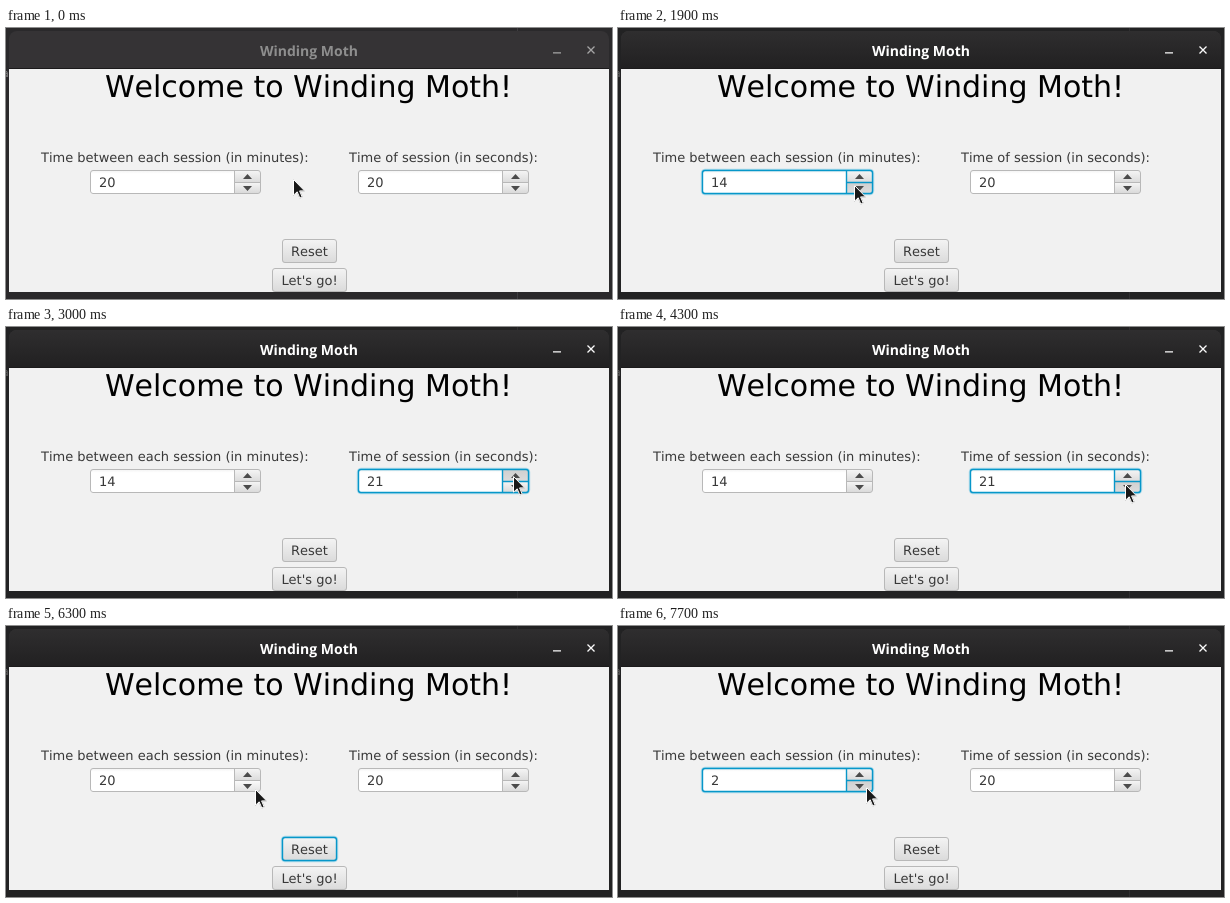
Recreate the animation shown at these times as an HTML page. Size 606 px wide and 271 px high, loop 8 s.

```html
<!DOCTYPE html>
<html lang="en">
<head>
<meta charset="utf-8">
<title>Winding Moth</title>
<style>
html, body { margin: 0; width: 100%; height: 100%; overflow: hidden; background: #2a292b; }
svg { display: block; width: 606px; height: 271px; }
text {
  font: 13px "DejaVu Sans", sans-serif; fill: #383838;
  font-kerning: none; text-rendering: geometricPrecision;
}
.caption { font: bold 14px "Open Sans", "Noto Sans", sans-serif; text-anchor: middle; }
.heading { font-size: 30px; fill: #000; }
.mid { text-anchor: middle; }
.line { fill: none; stroke: #b8b8b8; }
.halo { fill: none; stroke: #039ed3; stroke-width: 1.4; opacity: 0; }
.focus .line { stroke: #0896c8; stroke-width: 1.4; }
.focus .halo { opacity: .3; }
.face { fill: url(#idle); }
.face.hover { fill: url(#hover); }
.face.down { fill: url(#down); }
.arrow { fill: #4b4b4b; }
#cursor { filter: drop-shadow(0 0 .6px #0008); }
</style>
</head>
<body>
<svg viewBox="0 0 606 271">
  <defs>
    <linearGradient id="idle" x2="0" y2="1"><stop stop-color="#f4f4f4"/><stop offset="1" stop-color="#dadada"/></linearGradient>
    <linearGradient id="hover" x2="0" y2="1"><stop stop-color="#fafafa"/><stop offset="1" stop-color="#e3e3e3"/></linearGradient>
    <linearGradient id="down" x2="0" y2="1"><stop stop-color="#d0d0d0"/><stop offset="1" stop-color="#dcdcdc"/></linearGradient>
    <linearGradient id="bar" x2="0" y2="1"><stop stop-color="#2f2e2f"/><stop offset="1" stop-color="#212021"/></linearGradient>
    <linearGradient id="field" x2="0" y2="1"><stop stop-color="#f1f1f1"/><stop offset=".16" stop-color="#fff"/></linearGradient>
  </defs>
  <rect width="606" height="271" fill="#2a292b"/>
  <path d="M511.5 0V271" stroke="#3d3c3f"/>
  <text x="-4" y="49" style="font-size:11px;fill:#8b8b8b">a</text>
  <rect id="shade" width="606" height="271" fill="#151416"/>
  <path d="M3 41V11a8 8 0 0 1 8-8H595a8 8 0 0 1 8 8V41z" fill="#353335"/>
  <path id="active" d="M3 41V11a8 8 0 0 1 8-8H595a8 8 0 0 1 8 8V41z" fill="url(#bar)"/>
  <path d="M3 40.5H603" stroke="#1b1a1b"/>
  <text id="caption" class="caption" x="303" y="28">Winding Moth</text>
  <path id="controls" d="M547 24.8h8M581.5 18.5l7 7m0-7l-7 7" fill="none" stroke-width="1.3"/>
  <rect x="3" y="41" width="600" height="223" fill="#f1f1f1"/>
  <text class="heading" x="98.9" y="69">Welcome to Winding Moth!</text>
  <text x="35" y="134">Time between each session (in minutes):</text>
  <text x="343" y="134">Time of session (in seconds):</text>
  <g id="form"></g>
  <path id="cursor" d="M.5 .5V16.2L4.2 12.8L6.8 19L9.2 18L6.6 11.9H11.6Z" fill="#191919" stroke="#fff" stroke-linejoin="round"/>
</svg>
<script>
const LOOP = 8000, STEP = 100;
const $ = id => document.getElementById(id);

// Pointer moves: start time, end time, x, y
const home = [287, 151];
const moves = [
  [500, 800, 236, 157],
  [2000, 2200, 588, 115],
  [2500, 2800, 507, 149],
  [3600, 4100, 507, 157],
  [4700, 5400, 301, 219],
  [5800, 6400, 248, 161]
];
const clicks = [[1100, "min"], [2900, "sec"], [5500, "reset"], [6400, "min"]];

const clamp = (v, lo, hi) => Math.min(hi, Math.max(lo, v));
const mix = (a, b, p) => a + (b - a) * p;
const grey = (a, b, p) => `rgb(${[0, 0, 0].fill(Math.round(mix(a, b, p)))})`;

// Presses made so far in a run of evenly spaced ones
const presses = (t, start, gap, max) => clamp(Math.floor((t - start) / gap) + 1, 0, max);

// Six clicks down, a reset, then one click that turns into a held button
const minutes = t => t < 5600
  ? 20 - presses(t, 1100, 150, 6)
  : 20 - presses(t, 6400, 300, 1) - presses(t, 6700, 60, 17);
const seconds = t => 20 + presses(t, 2900, 200, 3) - presses(t, 4100, 200, 3);

function tip(t) {
  let [x, y] = home;
  for (const [from, to, toX, toY] of moves) {
    const p = clamp((t - from) / (to - from), 0, 1), e = p * (2 - p);
    x = mix(x, toX, e);
    y = mix(y, toY, e);
  }
  return [Math.round(x), Math.round(y)];
}

const faces = [];
function face(owner, x, y, w, h, r = 0) {
  const id = "face" + faces.length;
  faces.push({ id, owner, x, y, w, h });
  return `<rect id="${id}" class="face" x="${x}" y="${y}" width="${w}" height="${h}" rx="${r}"/>`;
}

function frame(x, y, w, h) {
  return `<rect class="line" x="${x + .5}" y="${y + .5}" width="${w - 1}" height="${h - 1}" rx="2.5"/>
    <rect class="halo" x="${x - .5}" y="${y - .5}" width="${w + 1}" height="${h + 1}" rx="3.5"/>`;
}

function spinner(id, x) {
  const y = 142, split = x + 144.5, mid = x + 157.5;
  return `<g id="${id}">
    <rect x="${x}" y="${y}" width="171" height="24" rx="3" fill="url(#field)"/>
    ${face(id, x + 145, y + 1, 25, 12)}${face(id, x + 145, y + 13, 25, 10)}
    <path class="line" d="M${split} ${y + 1}v22M${split} ${y + 12.5}h26"/>
    ${frame(x, y, 171, 24)}
    <path class="arrow" d="M${mid - 4.5} 151h9l-4.5 -5zM${mid - 4.5} 158h9l-4.5 5z"/>
    <text id="${id}Value" x="${x + 9}" y="159"></text></g>`;
}

function button(id, x, y, w, label) {
  return `<g id="${id}">${face(id, x, y, w, 24, 3)}${frame(x, y, w, 24)}
    <text class="mid" x="${x + w / 2}" y="${y + 17}">${label}</text></g>`;
}

$("form").innerHTML = spinner("min", 84) + spinner("sec", 352) +
  button("reset", 276, 211, 55, "Reset") + button("go", 266, 240, 75, "Let's go!");

function render(t) {
  const [x, y] = tip(t);
  $("cursor").setAttribute("transform", `translate(${x} ${y})`);

  // The window lights up on the first click
  const on = clamp((t - 1000) / 300, 0, 1);
  $("active").setAttribute("opacity", on);
  $("shade").setAttribute("opacity", on * .35);
  $("caption").style.fill = grey(142, 255, on);
  $("controls").style.stroke = grey(165, 250, on);

  $("minValue").textContent = minutes(t);
  $("secValue").textContent = seconds(t);

  const last = clicks.filter(([time]) => time <= t).pop();
  const owner = last ? last[1] : "";
  for (const id of ["min", "sec", "reset", "go"])
    $(id).classList.toggle("focus", id === owner);
  for (const f of faces) {
    const over = x >= f.x && x < f.x + f.w && y >= f.y && y < f.y + f.h;
    const list = $(f.id).classList;
    list.toggle("hover", over);
    list.toggle("down", over && f.owner === owner && owner !== "reset");
  }
}

const start = performance.now();
function tick() {
  const t = (performance.now() - start) % LOOP;
  render(Math.floor(t / STEP) * STEP);
  requestAnimationFrame(tick);
}
tick();
</script>
</body>
</html>
```
